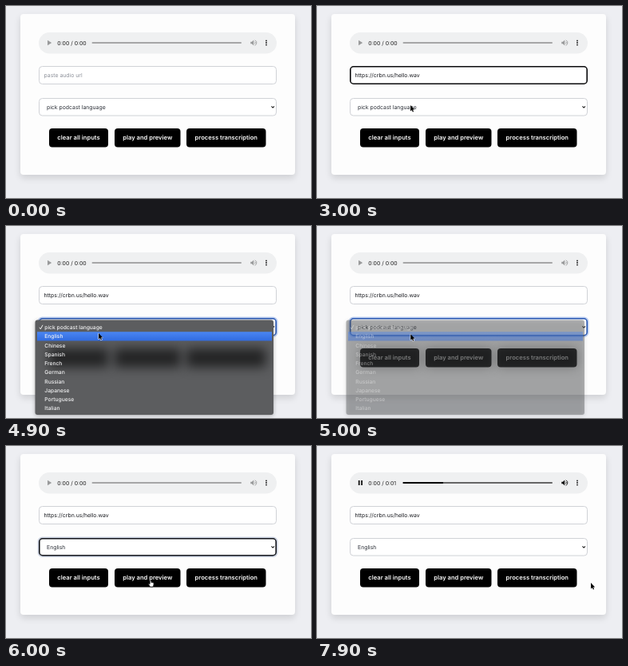
An HTML page with a canvas for the animation above (8 s loop, 382 px wide and 240 px high).

```html
<!DOCTYPE html>
<html lang="en">
<head>
<meta charset="utf-8">
<title>Podcast transcription form</title>
<style>
  html, body { margin: 0; width: 100%; height: 100%; overflow: hidden; background: #edeef2; }
  canvas { display: block; width: 382px; height: 240px; }
</style>
</head>
<body>
<canvas id="stage"></canvas>
<script>
const W = 382, H = 240, LOOP = 8000, STEP = 100;
const canvas = document.getElementById('stage');
const ctx = canvas.getContext('2d');
const scale = window.devicePixelRatio || 1;
canvas.width = W * scale;
canvas.height = H * scale;

const FOCUS_INPUT = 1300, PASTE = 2000, OPEN = 3300, HOVER_ENGLISH = 4500;
const FADE = 5000, CLOSE = 5100, CHOSEN = 5200, PLAY = 6100, LOADED = 7500;
const TRACK = { x0: 107.5, x1: 295, y: 46, ms: 1480 };
const PROMPT = 'pick podcast language';
const LANGUAGES = [PROMPT, 'English', 'Chinese', 'Spanish', 'French', 'German',
  'Russian', 'Japanese', 'Portuguese', 'Italian'];
const INPUT = { x: 41, y: 75, w: 298, h: 23 };
const SELECT = { x: 41, y: 115, w: 298, h: 22.5 };
const BUTTONS = [
  { x: 54, y: 153, w: 74, h: 23.5, label: 'clear all inputs' },
  { x: 136, y: 153, w: 82.5, h: 23.5, label: 'play and preview' },
  { x: 226, y: 153, w: 99.5, h: 23.5, label: 'process transcription' }
];

// Pointer stops: time, x, y
const PATH = [
  [100, 264, 226], [300, 200, 166], [500, 108, 108], [700, 62, 91], [900, 82, 114],
  [1200, 98, 86.5], [2100, 98, 86.5], [2600, 117.5, 129], [3000, 117, 124],
  [4200, 117, 124], [4700, 116, 134], [4900, 116, 134], [5100, 118.5, 136.5],
  [5300, 120, 138], [5800, 181, 167.5], [7200, 181, 167.5], [7800, 343, 171]
];

function pointerAt(t) {
  const i = PATH.findIndex(p => p[0] > t);
  if (i < 0) return PATH[PATH.length - 1].slice(1);
  const [t0, x0, y0] = PATH[i - 1], [t1, x1, y1] = PATH[i];
  const u = (t - t0) / (t1 - t0), k = u * u * (3 - 2 * u);
  return [x0 + (x1 - x0) * k, y0 + (y1 - y0) * k];
}

function box(x, y, w, h, r) {
  ctx.beginPath();
  ctx.roundRect(x, y, w, h, r);
}

function fillBox(x, y, w, h, r, color) {
  box(x, y, w, h, r);
  ctx.fillStyle = color;
  ctx.fill();
}

function text(s, x, y, color, size = 6.88, weight = 400, align = 'left') {
  ctx.font = `${weight} ${size}px Inter, "Liberation Sans", sans-serif`;
  ctx.textAlign = align;
  ctx.fillStyle = color;
  ctx.fillText(s, x, y);
}

function shape(points) {
  ctx.beginPath();
  points.forEach(([x, y], i) => i ? ctx.lineTo(x, y) : ctx.moveTo(x, y));
}

function line(points, color, width) {
  shape(points);
  ctx.strokeStyle = color;
  ctx.lineWidth = width;
  ctx.stroke();
}

function field({ x, y, w, h }, ring, halo) {
  if (halo) {
    box(x - 0.5, y - 0.5, w + 1, h + 1, 5);
    ctx.strokeStyle = halo;
    ctx.lineWidth = 2;
    ctx.stroke();
  }
  const inset = ring ? 0.8 : 0.5;
  box(x + inset, y + inset, w - 2 * inset, h - 2 * inset, 4);
  ctx.fillStyle = '#fff';
  ctx.fill();
  ctx.strokeStyle = ring || '#d0d2d7';
  ctx.lineWidth = ring ? 1.6 : 1;
  ctx.stroke();
}

function card() {
  ctx.fillStyle = '#edeef2';
  ctx.fillRect(0, 0, W, H);
  ctx.save();
  ctx.shadowColor = 'rgba(0,0,0,.13)';
  ctx.shadowBlur = 9 * scale;
  ctx.shadowOffsetY = 4 * scale;
  fillBox(18, 10, 344, 201, 4, '#fdfdfd');
  ctx.restore();
}

function speaker(color) {
  shape([[306.3, 44.7], [308, 44.7], [310.2, 42.5], [310.2, 49.5], [308, 47.3], [306.3, 47.3]]);
  ctx.fillStyle = color;
  ctx.fill();
  ctx.strokeStyle = color;
  ctx.lineWidth = 0.9;
  ctx.beginPath();
  ctx.arc(310.4, 46, 1.7, -1.1, 1.1);
  ctx.stroke();
  ctx.beginPath();
  ctx.arc(310.4, 46, 3.5, -1.2, 1.2);
  ctx.stroke();
}

function player(t) {
  const loaded = t >= LOADED;
  fillBox(41, 33, 298, 26.5, 13.25, '#eff0f1');
  if (t >= PLAY) {
    fillBox(51.8, 43, 1.8, 6, 0, '#111');
    fillBox(55.2, 43, 1.8, 6, 0, '#111');
  } else {
    shape([[52, 42.8], [57.2, 46], [52, 49.2]]);
    ctx.fillStyle = '#999a9b';
    ctx.fill();
  }
  text(loaded ? '0:00 / 0:01' : '0:00 / 0:00', 64.3, 48.5, '#222');
  const { x0, x1, y, ms } = TRACK;
  fillBox(x0, y - 0.8, x1 - x0, 1.6, 0.8, loaded ? '#3a3a3a' : '#8e8f90');
  if (loaded) fillBox(x0, y - 1, (x1 - x0) * (t - LOADED) / ms, 2, 1, '#000');
  speaker(loaded ? '#111' : '#999a9b');
  ctx.fillStyle = '#111';
  for (const dy of [-2.6, 0, 2.6]) {
    ctx.beginPath();
    ctx.arc(326, 46 + dy, 0.9, 0, 7);
    ctx.fill();
  }
}

function form(t) {
  const typing = t >= FOCUS_INPUT && t < OPEN, pasted = t >= PASTE;
  field(INPUT, typing && '#0b0b0d');
  text(pasted ? 'https://crbn.us/hello.wav' : 'paste audio url', 47.5, 88.8,
    pasted ? '#16181d' : '#8b8f98');
  if (typing && (t - FOCUS_INPUT) % 1000 < 500) {
    fillBox(pasted ? 128.6 : 47.8, 82, 0.8, 9, 0, '#111');
  }

  let ring, halo;
  if (t >= OPEN && t < PLAY) {
    ring = t < CHOSEN ? '#2858b5' : '#14161c';
    halo = t < CHOSEN ? 'rgba(70,120,220,.35)' : 'rgba(110,130,170,.35)';
  }
  field(SELECT, ring, halo);
  const ink = t === CLOSE ? '#555a63' : '#2a2e36';
  text(t >= CHOSEN ? 'English' : PROMPT, 51, 129, ink);
  line([[332.4, 125.4], [334.2, 127.2], [336, 125.4]], '#222', 1.1);

  for (const b of BUTTONS) {
    fillBox(b.x, b.y, b.w, b.h, 4, '#000');
    text(b.label, b.x + b.w / 2, b.y + 14.4, '#fff', 7.6, 600, 'center');
  }
}

function menu(t) {
  if (t < OPEN || t >= CLOSE) return;
  ctx.save();
  if (t >= FADE) ctx.globalAlpha = 0.45;
  ctx.save();
  ctx.shadowColor = 'rgba(0,0,0,.3)';
  ctx.shadowBlur = 5 * scale;
  ctx.shadowOffsetY = scale;
  fillBox(36.5, 117.5, 298.5, 118.5, 3, '#5c5d5f');
  ctx.restore();

  // Page buttons seen through the translucent panel
  ctx.save();
  box(36.5, 117.5, 298.5, 118.5, 3);
  ctx.clip();
  ctx.filter = `blur(${7 * scale}px)`;
  for (const b of BUTTONS) fillBox(b.x, b.y, b.w, b.h, 4, 'rgba(0,0,0,.62)');
  ctx.restore();

  const active = t >= HOVER_ENGLISH ? 1 : 0, pitch = 11.25;
  const top = 121 + active * pitch;
  const blue = ctx.createLinearGradient(0, top, 0, top + pitch);
  blue.addColorStop(0, '#4a86f2');
  blue.addColorStop(1, '#316be0');
  fillBox(39, top, 294, pitch, 0, blue);
  LANGUAGES.forEach((name, i) => text(name, 48.3, 129 + i * pitch, '#f4f4f5', 6.7, 500));
  line([[41.8, 126.8], [43.3, 128.8], [46, 123.8]], '#fff', 0.9);
  ctx.restore();
}

function inside([x, y], b) {
  return x > b.x && x < b.x + b.w && y > b.y && y < b.y + b.h;
}

function arrow() {
  shape([[0, 0], [0, 7.4], [1.7, 5.9], [2.9, 8.6], [4.1, 8.1], [2.9, 5.5], [5.2, 5.4]]);
  ctx.strokeStyle = '#fff';
  ctx.lineWidth = 1.1;
  ctx.stroke();
  ctx.fillStyle = '#000';
  ctx.fill();
}

function beam() {
  line([[-1.5, -4.3], [0, -3.7], [1.5, -4.3]], '#111', 0.8);
  line([[0, -3.8], [0, 3.8]], '#111', 0.9);
  line([[-1.5, 4.3], [0, 3.7], [1.5, 4.3]], '#111', 0.8);
}

function hand() {
  ctx.beginPath();
  ctx.moveTo(-0.8, 5);
  ctx.lineTo(-0.8, 0.6);
  ctx.quadraticCurveTo(0, -0.5, 0.8, 0.6);
  ctx.lineTo(0.9, 3);
  ctx.quadraticCurveTo(3.9, 2.8, 4.1, 4.3);
  ctx.quadraticCurveTo(4.2, 6.8, 3, 8.5);
  ctx.lineTo(-0.4, 8.5);
  ctx.lineTo(-2.5, 5.2);
  ctx.quadraticCurveTo(-2.4, 4, -0.8, 5);
  ctx.closePath();
  ctx.fillStyle = '#fff';
  ctx.fill();
  ctx.strokeStyle = '#111';
  ctx.lineWidth = 0.7;
  ctx.stroke();
}

function pointer(t) {
  if (t < PATH[0][0]) return;
  const p = pointerAt(t);
  const open = t >= OPEN && t < CLOSE;
  ctx.save();
  ctx.translate(...p);
  if (!open && inside(p, INPUT)) beam();
  else if (!open && BUTTONS.some(b => inside(p, b))) hand();
  else arrow();
  ctx.restore();
}

function draw(now) {
  const t = Math.floor((now % LOOP) / STEP) * STEP;
  ctx.setTransform(scale, 0, 0, scale, 0, 0);
  ctx.textRendering = 'geometricPrecision';
  ctx.lineJoin = 'round';
  card();
  player(t);
  form(t);
  menu(t);
  pointer(t);
}

const start = performance.now();
function tick() {
  draw(performance.now() - start);
  requestAnimationFrame(tick);
}
tick();
</script>
</body>
</html>
```
